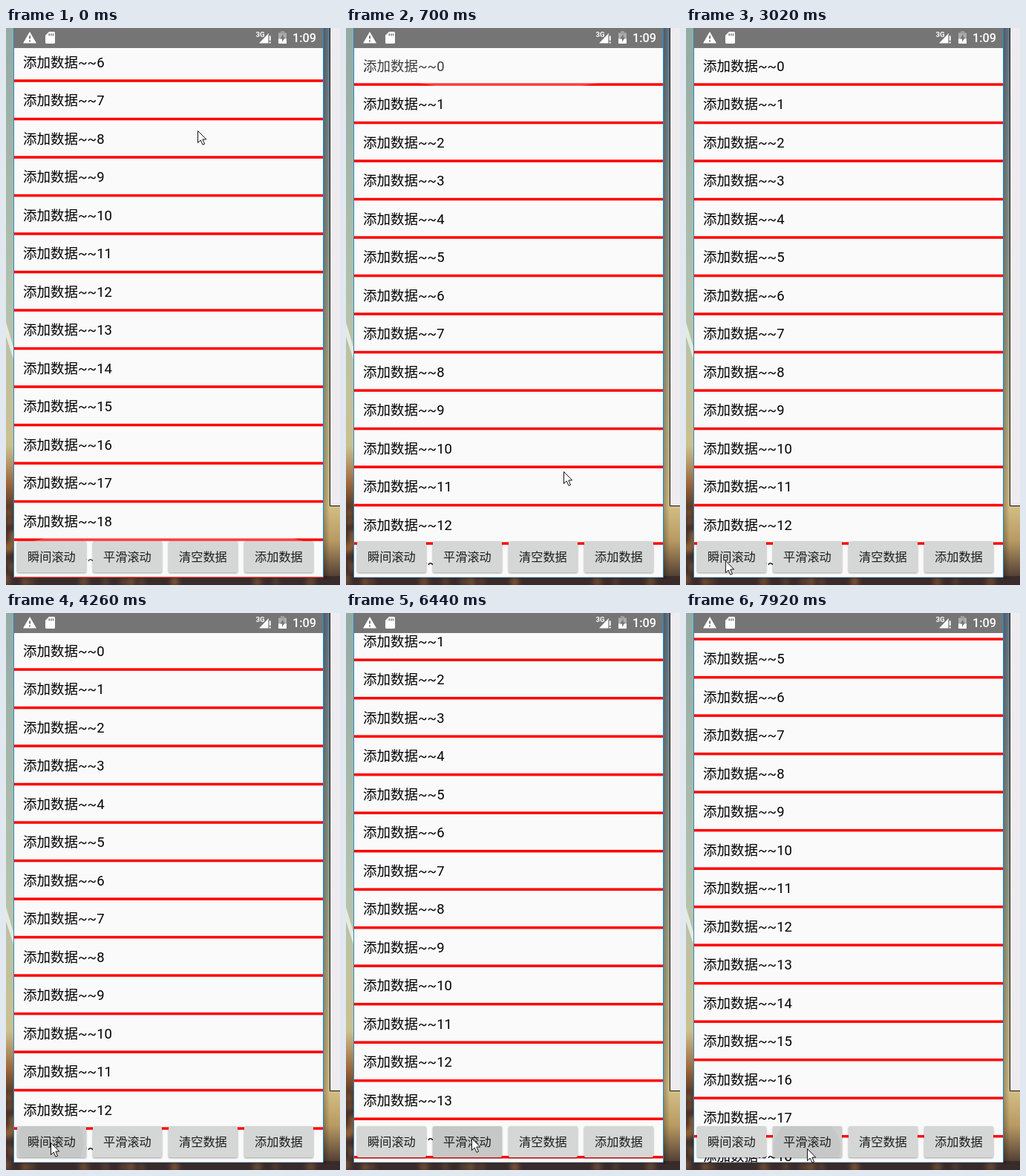
An HTML page that plays this animation: 450 px wide and 750 px high, repeating every 8000 ms.

```html
<!DOCTYPE html>
<html lang="zh-CN">
<head>
<meta charset="utf-8">
<title>列表滚动</title>
<style>
  html, body { margin: 0; width: 100%; height: 100%; overflow: hidden; background: #a9b8a8; }
  svg { display: block; width: 100vw; height: 100vh; }
  text { font-family: Roboto, "Noto Sans CJK SC", "Noto Sans CJK", sans-serif; }
  .row { font-size: 18.5px; fill: #000; }
  .line { fill: #f00; }
  .label { font-size: 16.2px; fill: #1c1c1c; text-anchor: middle; }
  .face { fill: #d5d7d6; filter: drop-shadow(0 1px 1.3px rgba(0, 0, 0, .38)); }
  .glow { fill: #fafafa; }
  .icon { fill: #fff; }
  .hole { fill: #757575; }
  #lights { filter: blur(3px); }
</style>
</head>
<body>
<svg viewBox="0 0 450 750" preserveAspectRatio="none">
  <defs>
    <linearGradient id="sky" x2="0" y2="1">
      <stop offset="0" stop-color="#93aaa3"/>
      <stop offset=".5" stop-color="#b4c2ac"/>
      <stop offset=".75" stop-color="#cbc08f"/>
      <stop offset=".82" stop-color="#9a653a"/>
      <stop offset=".87" stop-color="#4a3226"/>
      <stop offset="1" stop-color="#33262a"/>
    </linearGradient>
    <linearGradient id="dusk" x2="0" y2="1">
      <stop offset="0" stop-color="#65798d"/>
      <stop offset=".5" stop-color="#98a08c"/>
      <stop offset=".86" stop-color="#d2bd84"/>
      <stop offset=".92" stop-color="#b89a62"/>
      <stop offset="1" stop-color="#3b2b2a"/>
    </linearGradient>
    <linearGradient id="shade">
      <stop offset="0" stop-color="#000" stop-opacity=".28"/>
      <stop offset="1" stop-color="#000" stop-opacity="0"/>
    </linearGradient>
    <clipPath id="view"><rect x="11" y="27" width="416" height="713"/></clipPath>
  </defs>

  <rect width="220" height="750" fill="url(#sky)"/>
  <rect x="220" width="230" height="750" fill="url(#dusk)"/>
  <rect y="738" width="450" height="12" fill="#3a2b2b"/>
  <g id="lights"></g>
  <path d="M0 396L10 430V446L0 415Z" fill="#fff" opacity=".65"/>
  <rect x="427" width="9" height="742" fill="url(#shade)"/>
  <path d="M436.5 -1V643.5H451V-1Z" fill="#eeecef" stroke="#111"/>

  <rect x="10" width="418" height="740" fill="#2788c4"/>
  <rect x="11" width="416" height="27" fill="#757575"/>
  <rect x="11" y="27" width="416" height="712.5" fill="#fafafa"/>

  <g class="icon">
    <path d="M32 5L41 20.5H23Z"/>
    <path class="hole" d="M31 10.5h2v4h-2zM31 16.5h2v2h-2z"/>
    <path d="M58 5h6.5q1.5 0 1.5 1.5v13q0 1.5-1.5 1.5h-10q-1.5 0-1.5-1.5V10Z"/>
    <path class="hole" d="M57.5 7.5h1.5v3h-1.5zM60.2 7.5h1.5v3h-1.5zM62.8 7.5h1.5v3h-1.5z"/>
    <text x="336.5" y="12.3" font-size="9.5" font-weight="700">3G</text>
    <path d="M341 20.5L354 7V20.5Z"/>
    <path class="hole" d="M353.4 9h4.6v12h-4.6z"/>
    <path d="M354.7 10.5h2v6.5h-2zM354.7 18.5h2v2h-2z"/>
    <path d="M370 6h5v-1.5h-5zM367 6.5h11v14.5h-11z" opacity=".4"/>
    <path d="M367 14.5h11V21h-11z"/>
    <path class="hole" d="M373.5 8L369.5 14.5H372V19L376 12.5H373.5Z"/>
    <text x="386" y="19" font-size="16.3" font-weight="500">1:09</text>
  </g>

  <g clip-path="url(#view)">
    <g id="list"></g>
    <circle id="topGlow" class="glow" cx="219" r="624"/>
    <circle id="endGlow" class="glow" cx="219" r="624"/>
  </g>
  <g id="bar"></g>
  <path id="cursor" d="M.5 .5V16.5L4.2 13L7 19.2L9.6 18.1L6.9 12H11.8Z" fill="#fff" stroke="#111" stroke-linejoin="round"/>
</svg>

<script>
const LOOP = 8000, TICK = 140, PITCH = 51.5, END = 313.5;
const $ = id => document.getElementById(id);
const clamp = v => Math.min(1, Math.max(0, v));

function set(el, attrs) {
  for (const k in attrs) el.setAttribute(k, attrs[k]);
}
function add(parent, tag, attrs, text = '') {
  const el = document.createElementNS('http://www.w3.org/2000/svg', tag);
  set(el, attrs);
  el.textContent = text;
  return parent.appendChild(el);
}

// Blurred city lights along the bottom of the wallpaper.
let seed = 7;
const random = () => (seed = seed * 16807 % 2147483647) / 2147483647;
for (let i = 0; i < 26; i++) {
  const edge = i % 2;
  add($('lights'), 'circle', {
    cx: edge ? random() * 10 : random() * 450,
    cy: edge ? 610 + random() * 130 : 746,
    r: 3 + random() * 4, fill: '#b87a3e', opacity: .2 + random() * .4
  });
}

for (let i = 0; i < 20; i++) {
  const y = i * PITCH;
  add($('list'), 'text', { class: 'row', x: 23, y: y + 57.5 }, '添加数据~~' + i);
  add($('list'), 'rect', { class: 'line', x: 11, y: y + 74.3, width: 416, height: 3.5 });
}

const buttons = ['瞬间滚动', '平滑滚动', '清空数据', '添加数据'].map((name, i) => {
  const x = 15 + i * 102;
  const box = { x, y: 691, width: 93, height: 42, rx: 2 };
  add(add($('bar'), 'clipPath', { id: 'clip' + i }), 'rect', box);
  add($('bar'), 'rect', { ...box, class: 'face' });
  const tint = add($('bar'), 'rect', { ...box, opacity: 0 });
  const ripple = add($('bar'), 'circle', { 'clip-path': `url(#clip${i})`, opacity: 0 });
  add($('bar'), 'text', { class: 'label', x: x + 46.4, y: 717.5 }, name);
  return { tint, ripple };
});

// Pointer stops: time, x, y.
const stops = [
  [0, 258, 138], [700, 293, 597], [1120, 262, 620], [1960, 55, 678], [2240, 28, 731],
  [3140, 60, 713], [4700, 60, 713], [5320, 134, 248], [5740, 222, 420], [6160, 169, 707],
  [7100, 169, 707], [7700, 163, 721]
];
function pointer(t) {
  const n = stops.findIndex(s => s[0] > t);
  if (n < 0) return stops[stops.length - 1].slice(1);
  const [t0, x0, y0] = stops[n - 1], [t1, x1, y1] = stops[n];
  const k = (t - t0) / (t1 - t0);
  return [x0 + (x1 - x0) * k, y0 + (y1 - y0) * k];
}

// Decelerating scroll that begins at the given time.
const glide = (t, begin) => 1 - (1 - clamp((t - begin) / 256)) ** 2;

function scrollAt(t, y) {
  if (t < 700) return Math.max(0, 314 - (y - 138));
  if (t < 4300) return 0;
  return END * (1 - glide(t, 6300) + glide(t, 7702));
}

function press({ tint, ripple }, age, cx, cy) {
  const fade = age < 0 ? 0 : clamp((450 - age) / 120);
  set(tint, { opacity: .04 * fade * clamp(age / 100) });
  set(ripple, { cx, cy, r: Math.max(0, age * .32), opacity: .035 * fade });
}

function draw(now) {
  // The screen refreshes in steps.
  const t = Math.floor((now % LOOP) / TICK) * TICK;
  const [x, y] = pointer(t);
  set($('cursor'), { transform: `translate(${x} ${y})` });
  set($('list'), { transform: `translate(0 ${-scrollAt(t, y)})` });

  const pull = clamp(1 - Math.abs(t - 700) / 400);
  set($('topGlow'), { opacity: .24 * pull, cy: 50 + 36 * pull - 624 });
  const rest = clamp(1 - t / 290);
  set($('endGlow'), { opacity: .24 * rest, cy: 740 - 76 * rest + 624 });

  press(buttons[0], t - 4060, x, y);
  press(buttons[1], t - (t < 7000 ? 6120 : 7700), x, y);
}

let start;
function loop(now) {
  start ??= now;
  draw(now - start);
  requestAnimationFrame(loop);
}
draw(0);
requestAnimationFrame(loop);
</script>
</body>
</html>
```
